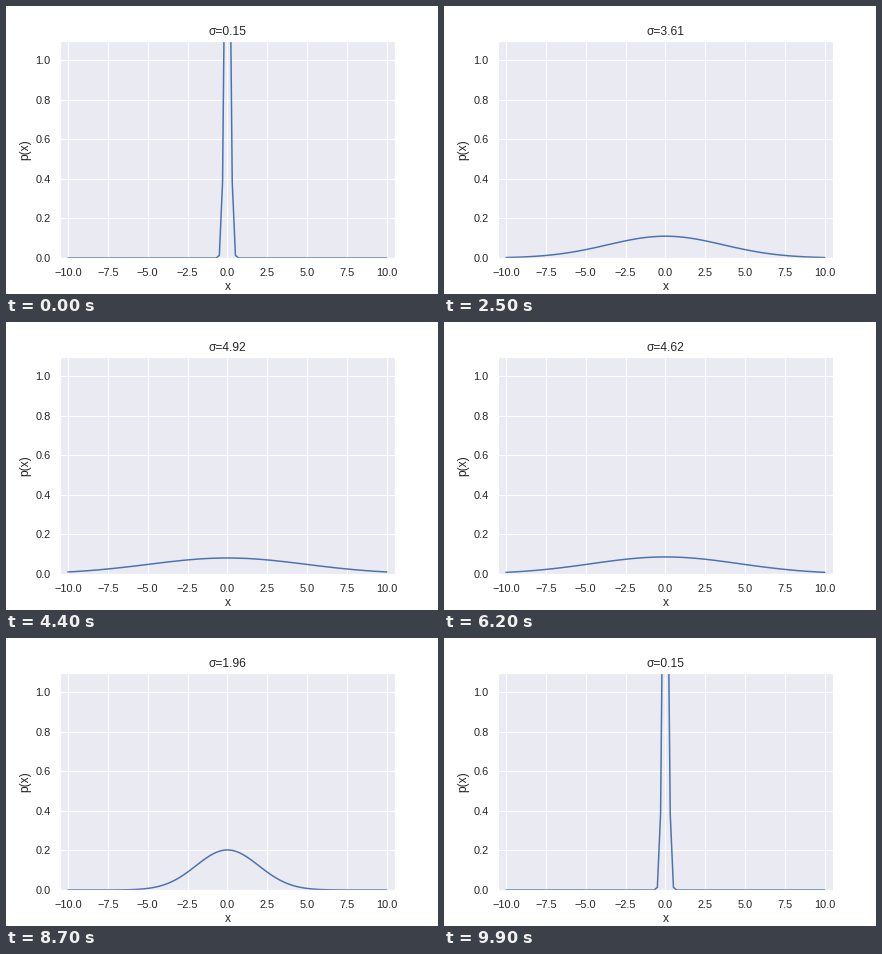
Write a matplotlib script that moves like this. It is 432 px wide and 288 px high and loops after 10 s.

```python
import matplotlib.pyplot as plt
import numpy as np
from matplotlib.animation import FuncAnimation

FRAMES = 100
INTERVAL = 100
DARK = "0.15"

plt.rcParams.update({
    "font.family": "Liberation Sans",
    "font.size": 12,
    "axes.labelsize": 12,
    "axes.titlesize": 12,
    "axes.titlepad": 6,
    "axes.labelpad": 4,
    "axes.facecolor": "#EAEAF2",
    "axes.edgecolor": "white",
    "axes.linewidth": 1.25,
    "axes.labelcolor": DARK,
    "axes.axisbelow": True,
    "axes.grid": True,
    "grid.color": "white",
    "grid.linestyle": "-",
    "grid.linewidth": 1,
    "text.color": DARK,
    "xtick.color": DARK,
    "ytick.color": DARK,
    "xtick.labelsize": 11,
    "ytick.labelsize": 11,
    "xtick.bottom": False,
    "ytick.left": False,
    "xtick.major.size": 6,
    "ytick.major.size": 6,
    "lines.solid_capstyle": "round",
})


def sigma_at(frame):
    """Half a sine wave, skipping the zeros at both ends."""
    return 5 * np.sin(np.pi * (frame + 1) / (FRAMES + 1))


def normal_pdf(x, sigma):
    return np.exp(-x**2 / (2 * sigma**2)) / (sigma * np.sqrt(2 * np.pi))


fig = plt.figure(figsize=(6, 4), dpi=72, facecolor="white")
fig.subplots_adjust(left=0.125, right=0.9, bottom=0.125, top=0.88)
ax = fig.add_subplot()
ax.set(xlim=(-10.5, 10.5), ylim=(0, 1.1), xlabel="x", ylabel="p(x)")
ax.set_xticks(np.arange(-10, 10.1, 2.5))
ax.set_yticks(np.arange(0, 1.1, 0.2))

x = np.linspace(-10, 10, 100)
curve, = ax.plot(x, np.zeros_like(x), color="#4C72B0", linewidth=1.5)
title = ax.set_title("")


def update(frame):
    sigma = sigma_at(frame)
    curve.set_ydata(normal_pdf(x, sigma))
    # The readout is cut to two decimals, not rounded.
    title.set_text(f"σ={np.floor(sigma * 100) / 100:.2f}")
    return curve, title


anim = FuncAnimation(fig, update, frames=FRAMES, interval=INTERVAL,
                     init_func=lambda: update(0), repeat=True, repeat_delay=0)
plt.show()
```
